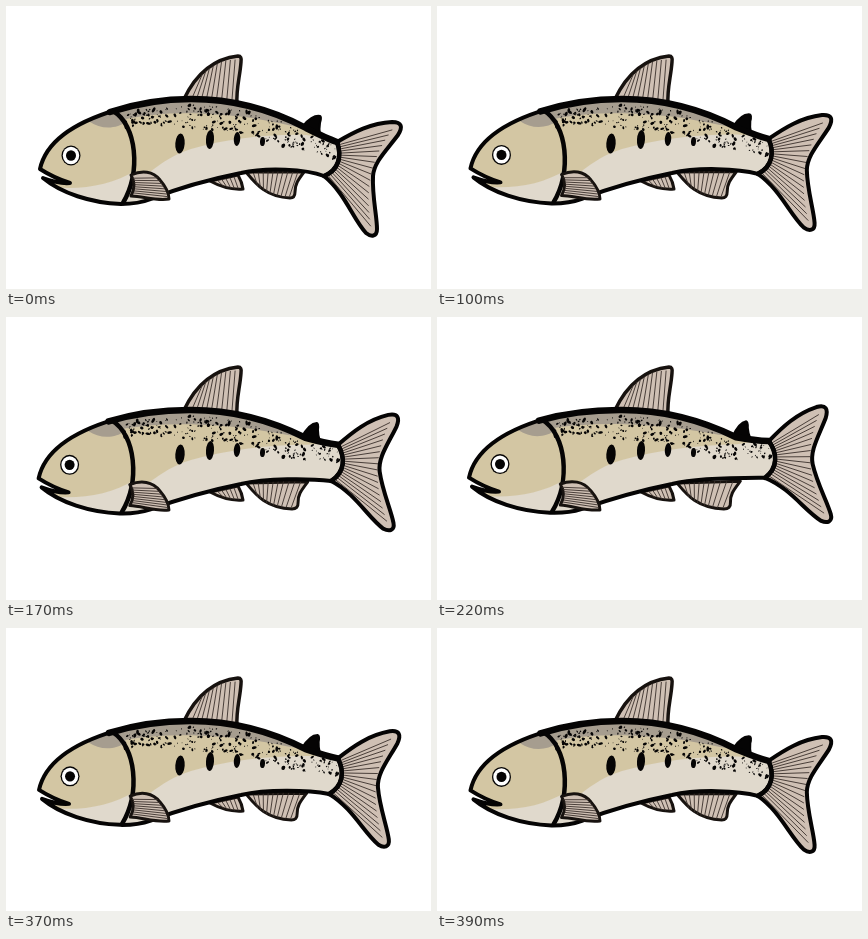
These frames come from a looping animation (425 px wide and 283 px high, 440 ms). An HTML page with a canvas:

```html
<!DOCTYPE html>
<html lang="en">
<head>
<meta charset="utf-8">
<title>Swimming fish</title>
<style>
html, body { margin: 0; width: 100%; height: 100%; overflow: hidden; background: #fff; }
canvas { display: block; }
</style>
</head>
<body>
<canvas id="stage" width="425" height="283"></canvas>
<script>
const ctx = document.getElementById('stage').getContext('2d');
const INK = '#050404', FIN = '#cfc0b4', TAN = '#d3c6a3', BELLY = '#e0d9cc', BACK = '#a69d8f';
const LOOP = 440;
// [start in ms, amount of upward tail bend]
const POSES = [[0, 0], [100, .26], [150, .48], [170, .69], [220, 1], [320, .69], [370, .48], [390, .26]];
const MAX_ANGLE = -15.6 * Math.PI / 180;
const PIVOT = { x: 288, y: 127 };
let bend = 0;

function smoothstep(a, b, x) {
  const t = Math.min(1, Math.max(0, (x - a) / (b - a)));
  return t * t * (3 - 2 * t);
}

// The tail turns about the pivot while the head drifts slightly up and left.
function warp(x, y) {
  const angle = MAX_ANGLE * bend * smoothstep(270, 325, x);
  const head = bend * (1 - smoothstep(110, 170, x));
  const dx = x - PIVOT.x, dy = y - PIVOT.y;
  const c = Math.cos(angle), s = Math.sin(angle);
  return [PIVOT.x + dx * c - dy * s - 2 * head, PIVOT.y + dx * s + dy * c - 2.4 * head];
}

function shape(d) {
  return new Path2D(d.replace(/([\d.]+),([\d.]+)/g, (_, x, y) => warp(+x, +y).join(',')));
}

function draw(d, fill, width, color = INK) {
  const path = shape(d);
  if (fill) { ctx.fillStyle = fill; ctx.fill(path); }
  if (width) { ctx.lineWidth = width; ctx.strokeStyle = color; ctx.stroke(path); }
}

function quad([a, b, c], t) {
  const u = 1 - t;
  return [0, 1].map(i => u * u * a[i] + 2 * u * t * b[i] + t * t * c[i]);
}

function rays(count, base, edge, width = .9) {
  let d = '';
  for (let i = 1; i < count; i++) d += `M${quad(base, i / count)}L${quad(edge, i / count)}`;
  draw(d, null, width, '#3a302c');
}

function ellipse(x, y, rx, ry, color, tilt = 0) {
  const [cx, cy] = warp(x, y);
  ctx.fillStyle = color;
  ctx.beginPath();
  ctx.ellipse(cx, cy, rx, ry, tilt, 0, 7);
  ctx.fill();
}

function seeded(seed) {
  return () => (seed = seed * 16807 % 2147483647) / 2147483647;
}

const rnd = seeded(4711);
const backY = x => 93 + (x - 185) ** 2 * .00207;
const specks = Array.from({ length: 270 }, () => {
  const x = 119 + 210 * rnd();
  const depth = 15 + 10 * smoothstep(115, 190, x) - 11 * smoothstep(270, 330, x);
  return { x, y: backY(x) + 5 + depth * rnd() ** .85, r: .35 + 1.1 * rnd() ** 1.5, stretch: 1 + rnd(), tilt: 3 * rnd() };
});

const BACK_LINE = 'C40,135 70,116 110,104 C135,96 160,93 185,93 C230,93 270,106 300,122 C312,128 322,133 331,136';
const BODY = 'M34,163 ' + BACK_LINE + ' C336,150 333,164 318,170 C300,163 260,161 235,167 ' +
  'C200,174 165,185 145,193 C135,197 125,198 115,198 C85,197 55,187 37,172 Q53,178 64,177 Q48,172 34,163 Z';

function drawTail() {
  draw('M331,136 C348,126 365,117 386,116 C396,116 397,121 392,129 C380,145 368,156 367,170 ' +
    'C366,190 371,210 371,223 C371,231 365,231 360,227 C347,213 339,187 318,170 C333,164 336,150 331,136 Z', FIN, 4);
  rays(18, [[331, 137], [339, 156], [319, 170]], [[390, 119], [352, 163], [366, 227]]);
}

function drawRearFins() {
  draw('M178,93 C188,72 205,53 232,50 Q236,50 235,56 C234,71 230,82 231,98 Z', FIN, 3.5, '#17120f');
  rays(10, [[181, 93], [205, 91], [231, 97]], [[193, 72], [209, 53], [234, 54]]);
  draw('M296,121 C302,113 309,109 314,110 Q316,111 314,117 Q313,122 314,129 Z', INK, 2);
  draw('M240,166 C250,178 260,191 284,192 Q289,192 289,186 C289,178 292,174 298,166 Z', FIN, 3, '#17120f');
  rays(11, [[242, 167], [270, 162], [297, 166]], [[249, 177], [263, 192], [288, 190]]);
  draw('M204,175 C215,181 225,184 237,183 Q236,176 232,169 Z', FIN, 3, '#17120f');
  rays(6, [[207, 175], [220, 172], [232, 170]], [[214, 179], [224, 183], [236, 182]]);
}

function drawBody() {
  ctx.save();
  ctx.clip(shape(BODY));
  draw(BODY, TAN);
  draw('M110,185 C140,176 150,154 185,143 C220,133 260,128 300,129 L345,136 L345,205 L110,205 Z', BELLY);
  draw('M45,181 C75,184 105,180 130,164 L130,205 L45,205 Z', BELLY);
  draw('M110,100 L185,88 C220,88 265,101 306,124 C270,117 245,110 215,109 C180,106 150,107 120,113 Z', BACK);
  draw('M84,112 L112,98 L121,115 C110,124 94,123 84,116 Z', BACK);
  for (const s of specks) ellipse(s.x, s.y, s.r * s.stretch, s.r, INK, s.tilt);
  ctx.restore();

  for (const [x, y, rx, ry] of [[174, 137.5, 4.7, 10], [204, 133.5, 4, 9.5], [231, 133, 3.2, 7], [256.5, 135.5, 2.5, 4.6], [277, 140, 1.7, 2]])
    ellipse(x, y, rx, ry, INK, .07);
  draw(BODY, null, 4);
  draw('M104,106 C135,96 160,93 185,93 C230,93 270,106 300,122 C312,128 322,133 331,136', null, 6.5);
  draw('M331,136 C336,150 333,164 318,170', null, 4.5);
}

function drawHead() {
  draw('M107,105 C131,119 135,166 117,197', null, 4.5);
  ellipse(65, 149.5, 9.5, 10, INK);
  ellipse(65, 149.5, 8.2, 8.7, '#fff');
  ellipse(65, 149.5, 5, 5.2, INK);
  draw('M125,169 C136,164 147,165 154,174 C160,181 163,187 163,193 C149,195 137,190 125,190 Q131,179 125,169 Z', FIN, 3, '#17120f');
  rays(9, [[126, 170], [132, 180], [127, 189]], [[149, 169], [161, 182], [161, 193]]);
}

function render(now) {
  const time = now % LOOP;
  bend = POSES.findLast(([start]) => time >= start)[1];
  ctx.fillStyle = '#fff';
  ctx.fillRect(0, 0, 425, 283);
  ctx.lineJoin = ctx.lineCap = 'round';
  drawTail();
  drawRearFins();
  drawBody();
  drawHead();
}

let origin;
function tick(now) {
  origin ??= now;
  render(now - origin);
  requestAnimationFrame(tick);
}
render(0);
requestAnimationFrame(tick);
</script>
</body>
</html>
```
